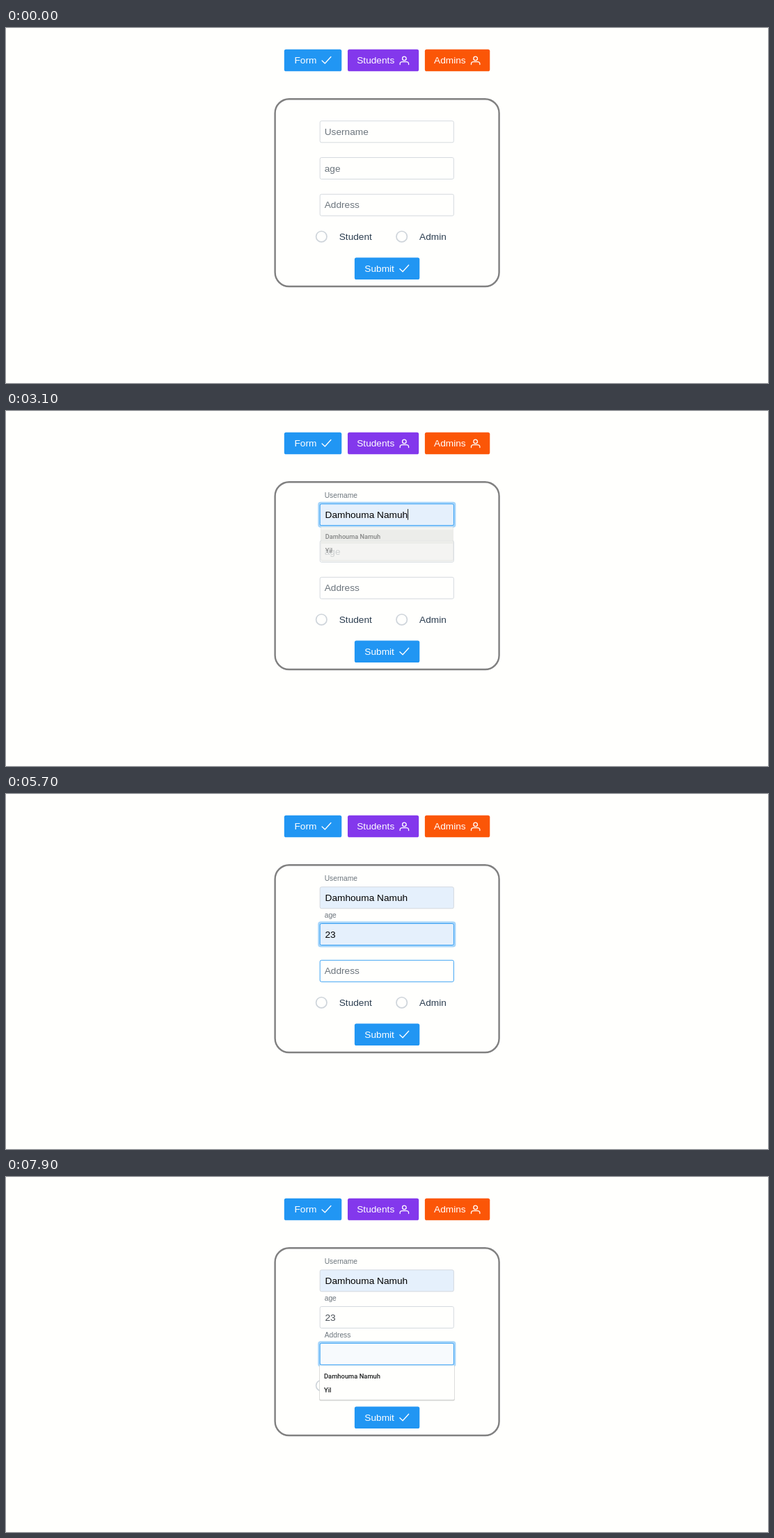
These frames come from a looping animation (1095 by 511 pixels, 8 s). An HTML page with a canvas:

```html
<!DOCTYPE html>
<html lang="en">
<head>
<meta charset="utf-8">
<title>Registration form</title>
<style>
  html, body { margin: 0; width: 100%; height: 100%; overflow: hidden; background: #fffffd; }
  canvas { display: block; width: 1095px; height: 511px; }
</style>
</head>
<body>
<canvas id="stage"></canvas>
<script>
const W = 1095, H = 511, LOOP = 8000, TICK = 100;
const SANS = '"Liberation Sans", Arial, sans-serif';
const LIST_FONT = '500 9.4px Roboto, sans-serif';
const BODY = 13.69, SMALL = 10.27, PREVIEW = 11.4;

const PAGE = [255, 255, 253], TINT = [229, 240, 252], BLACK = [0, 0, 0];
const GREY = [206, 212, 218], BLUE = [33, 150, 243], INK = [73, 80, 87];

const FULL_NAME = 'Damhouma Namuh', SHORT_NAME = 'Yil';
const LEFT = 451.2, WIDTH = 192.2, HEIGHT = 31, TEXT_X = 458.5;

// All times in ms; "caret" holds the moments at which the caret toggles.
const fields = [
  { label: 'Username', y: 133.8, items: [FULL_NAME, SHORT_NAME],
    hover: 680, focus: 1080, open: 1100, preview: 2400, tint: 2320, pick: 3000, close: 3200, blur: 3820,
    caret: [1100, 1700, 2300, 2900, 3100, 3700] },
  { label: 'age', y: 186.5, items: ['23', '12'],
    hover: 3320, focus: 3820, open: 3900, preview: 4600, tint: 4620, pick: 5200, close: 5300, blur: 5880, clear: 5880,
    caret: [3900, 4400, 5100, 5700] },
  { label: 'Address', y: 239.3, items: [FULL_NAME, SHORT_NAME],
    hover: 5420, focus: 5880, open: 5900, preview: 6400, tint: 6520, leave: 7800, clear: 7820,
    caret: [5900, 6600, 7200, 7800] },
];

const canvas = document.getElementById('stage');
const ctx = canvas.getContext('2d');
const dpr = window.devicePixelRatio || 1;
canvas.width = W * dpr;
canvas.height = H * dpr;

const lerp = (a, b, p) => a + (b - a) * p;
const mix = (a, b, p) => `rgb(${a.map((v, i) => Math.round(lerp(v, b[i], p)))})`;

// Progress of a 200 ms eased transition.
function progress(t, start = Infinity) {
  const x = Math.min(1, Math.max(0, (t - start) / 200));
  return 1 - (1 - x) ** 2.2;
}

function box(x, y, w, h, r, fill, stroke, line) {
  ctx.beginPath();
  ctx.roundRect(x, y, w, h, r);
  if (fill) { ctx.fillStyle = fill; ctx.fill(); }
  if (stroke) { ctx.strokeStyle = stroke; ctx.lineWidth = line; ctx.stroke(); }
}

function text(string, x, y, color, font = BODY) {
  ctx.font = typeof font === 'number' ? `${font}px ${SANS}` : font;
  ctx.fillStyle = color;
  ctx.fillText(string, x, y);
}

function icon(path, x, y) {
  ctx.save();
  ctx.translate(x, y);
  ctx.strokeStyle = '#fff';
  ctx.lineWidth = 1.3;
  ctx.lineCap = ctx.lineJoin = 'round';
  ctx.stroke(new Path2D(path));
  ctx.restore();
}
const CHECK = 'M0.8 6.5 L5 10.5 L13.6 1';
const PERSON = 'M4 3.4 a2.8 2.8 0 1 0 5.6 0 a2.8 2.8 0 1 0 -5.6 0 M0.6 12 v-0.8 q0 -3 3.4 -3 h5.6 q3.4 0 3.4 3 v0.8';

function button(label, x, y, w, textX, color, path, iconX) {
  box(x, y, w, 31.4, 2.57, color);
  text(label, textX, y + 20.6, '#fff');
  icon(path, iconX, y + 9.7);
}

function radio(label, x) {
  ctx.beginPath();
  ctx.arc(x, 300.2, 7.7, 0, 2 * Math.PI);
  ctx.strokeStyle = mix(GREY, GREY, 0);
  ctx.lineWidth = 1.7;
  ctx.stroke();
  text(label, x + 25.4, 304.6, '#2c3e50');
}

function drawField(f, t) {
  const base = f.y + 20.1;
  const focused = progress(t, f.focus) - progress(t, f.blur);
  const active = progress(t, f.hover) - progress(t, f.blur);
  const tinted = progress(t, f.tint) - progress(t, f.clear);
  const picked = t >= f.pick;

  if (focused > 0) {
    ctx.globalAlpha = focused;
    box(LEFT - 3, f.y - 3, WIDTH + 6, HEIGHT + 6, 4, '#a6d5fa');
    ctx.globalAlpha = 1;
  }
  box(LEFT, f.y, WIDTH, HEIGHT, 2.2, mix(PAGE, TINT, tinted), mix(GREY, BLUE, active), 0.86);

  const lift = progress(t, f.focus);
  text(f.label, 457.7, lerp(base, f.y - 8.5, lift), '#6c757d', lerp(BODY, SMALL, lift));

  let caretX = TEXT_X + 0.5;
  if (t >= f.preview && !(t >= f.leave)) {
    text(f.items[0], TEXT_X, base, mix(INK, BLACK, tinted), picked ? BODY : PREVIEW);
    if (picked) caretX = TEXT_X + ctx.measureText(f.items[0]).width;
  }
  if (f.caret.filter(time => t >= time).length % 2) {
    ctx.fillStyle = mix(INK, BLACK, tinted);
    ctx.fillRect(caretX, f.y + 7.3, 0.9, 15.6);
  }
}

function drawPopup(f, t) {
  if (t < f.open || t >= f.close) return;
  const top = f.y + 31.9;
  const h = t < 1200 ? 92 : 51;
  ctx.save();
  if (t >= f.close - TICK) {
    const cx = LEFT + WIDTH / 2, cy = top + h / 2;
    ctx.globalAlpha = 0.5;
    ctx.translate(cx, cy);
    ctx.scale(0.98, 0.98);
    ctx.translate(-cx, -cy);
  }
  box(450.2, top, 194.6, h, [0, 0, 2, 2], '#d4d5d3');
  box(451, top, 193, h - 1.7, [0, 0, 1.5, 1.5], mix(PAGE, PAGE, 0));
  if (t >= f.preview && !(t >= f.leave)) box(451, top + 4.7, 193, 20.5, 0, '#e6e7e4');
  f.items.forEach((item, i) => text(item, 457, top + 18.4 + 20.5 * i, '#1c1e1f', LIST_FONT));
  ctx.restore();
}

function draw(t) {
  ctx.setTransform(dpr, 0, 0, dpr, 0, 0);
  ctx.fillStyle = mix(PAGE, PAGE, 0);
  ctx.fillRect(0, 0, W, H);

  button('Form', 399.8, 30.8, 82.5, 414.5, '#2196f3', CHECK, 453.3);
  button('Students', 491, 30.8, 102.2, 504.2, '#8338ec', PERSON, 565.6);
  button('Admins', 601.9, 30.8, 93.4, 615, '#fb5607', PERSON, 667.9);

  box(386.6, 102.2, 322, 269.8, 20.2, null, '#808080', 2.4);
  fields.forEach(f => drawField(f, t));
  radio('Student', 453.3);
  radio('Admin', 568.7);
  button('Submit', 500.9, 330.6, 93.4, 515.3, '#2196f3', CHECK, 565.1);
  fields.forEach(f => drawPopup(f, t));
}

function frame() {
  const t = performance.now() % LOOP;
  draw(Math.floor(t / TICK) * TICK);
  requestAnimationFrame(frame);
}
frame();
</script>
</body>
</html>
```
